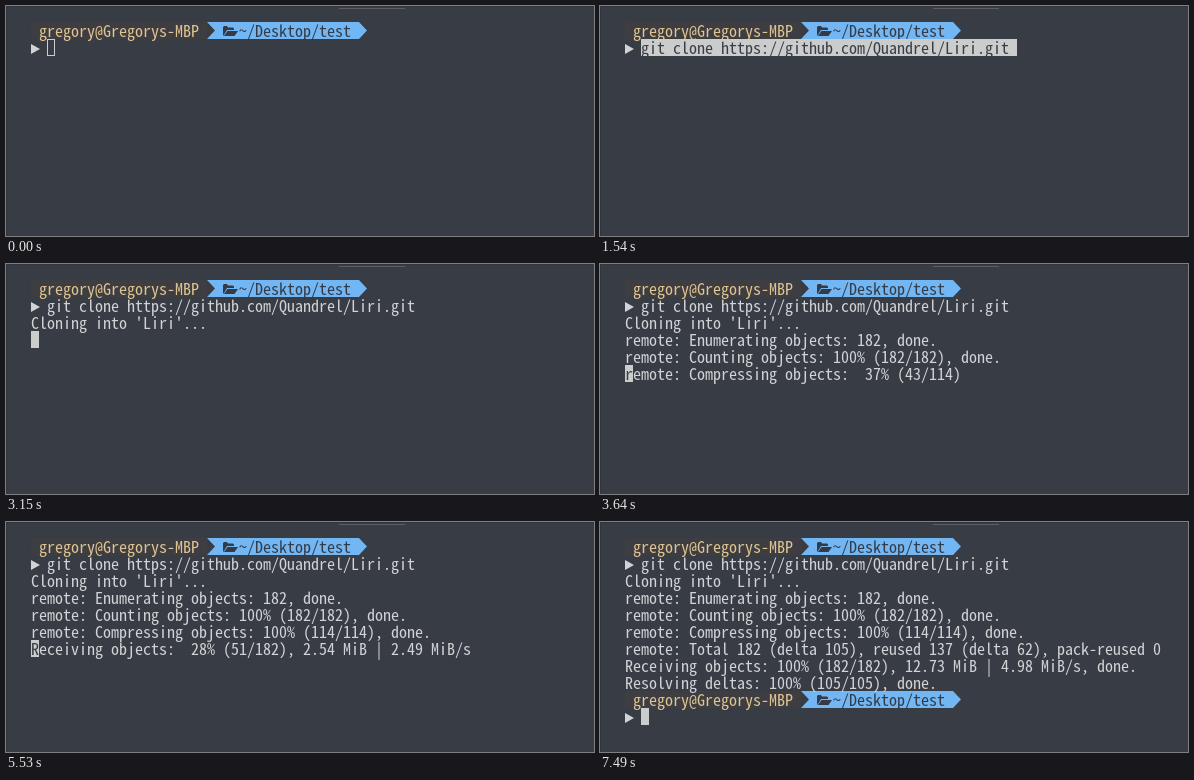
An HTML page with a canvas for the animation above (7560 ms loop, 588 by 230 pixels).

```html
<!DOCTYPE html>
<html lang="en">
<head>
<meta charset="utf-8">
<title>Cloning a repository</title>
<style>
  html, body { margin: 0; width: 100%; height: 100%; overflow: hidden; background: #383c45; }
  canvas { display: block; width: 588px; height: 230px; }
</style>
</head>
<body>
<canvas id="stage" width="588" height="230"></canvas>
<script>
const ctx = document.getElementById('stage').getContext('2d');
const LOOP = 7560, LEFT = 25, TOP = 16, CELL = 8, LINE = 17;
const BG = '#383c45', TEXT = '#d2d3d4', CURSOR = '#cbcccc', BLUE = '#72b6f3', INK = '#343b46';
const FAMILY = '"Noto Sans Mono CJK JP", "Noto Sans Mono CJK SC", "DejaVu Sans Mono", monospace';
const COMMAND = 'git clone https://github.com/Quandrel/Liri.git';

// Choose the font size whose natural advance fills one cell, and centre capitals in the line.
ctx.font = `100px ${FAMILY}`;
const sample = ctx.measureText('H');
const fontSize = CELL / sample.width * 100;
const baseline = Math.round(9 + sample.actualBoundingBoxAscent * fontSize / 200);
ctx.font = `${fontSize}px ${FAMILY}`;

const colX = col => LEFT + col * CELL;
const rowY = row => TOP + row * LINE;

function write(text, col, row, color = TEXT) {
  ctx.fillStyle = color;
  ctx.fillText(text, colX(col), rowY(row) + baseline);
}

function block(col, row, count = 1, color = CURSOR) {
  ctx.fillStyle = color;
  ctx.fillRect(colX(col), rowY(row), count * CELL, LINE);
}

function polygon(color, points) {
  ctx.fillStyle = color;
  ctx.beginPath();
  points.forEach(([x, y]) => ctx.lineTo(x, y));
  ctx.fill();
}

function folder(x, y) {
  polygon(INK, [[x, y + 10], [x, y + 1], [x + 1, y], [x + 4, y], [x + 5, y + 1.5],
    [x + 10, y + 1.5], [x + 11, y + 2.5], [x + 11, y + 4], [x + 4, y + 4], [x + 1, y + 9]]);
  polygon(INK, [[x + 1, y + 10], [x + 4.5, y + 5], [x + 15, y + 5], [x + 11.5, y + 10]]);
}

function prompt(row) {
  const y = rowY(row), mid = y + LINE / 2, end = y + LINE;
  block(0, row, 22, '#3d3d42');
  polygon(BLUE, [[201, y], [353, y], [361, mid], [353, end], [201, end], [209, mid]]);
  write('gregory@Gregorys-MBP', 1, row, '#e0c590');
  folder(217, y + 4);
  write('~/Desktop/test', 26, row, INK);
  polygon(TEXT, [[25, y + 22], [34, y + 27], [25, y + 32]]);
}

// Output lines below the command; each appears, and may be rewritten, at the given times.
const receiving = (percent, count, rate = '') =>
  `Receiving objects:  ${percent}% (${count}/182)${rate && ', ' + rate}`;
const output = [
  [2, 3010, "Cloning into 'Liri'..."],
  [3, 3570, 'remote: Enumerating objects: 182, done.'],
  [4, 3570, 'remote: Counting objects:  58% (106/182)'],
  [4, 3640, 'remote: Counting objects: 100% (182/182), done.'],
  [5, 3640, 'remote: Compressing objects:  37% (43/114)'],
  [5, 3710, 'remote: Compressing objects:  78% (89/114)'],
  [5, 3850, 'remote: Compressing objects: 100% (114/114), done.'],
  [6, 3920, receiving(21, 39)],
  [6, 4690, receiving(27, 50, '1.06 MiB | 996.00 KiB/s')],
  [6, 4970, receiving(27, 50, '2.54 MiB | 2.49 MiB/s')],
  [6, 5530, receiving(28, 51, '2.54 MiB | 2.49 MiB/s')],
  [6, 6090, receiving(28, 52, '7.25 MiB | 3.97 MiB/s')],
  [6, 6230, receiving(29, 53, '7.25 MiB | 3.97 MiB/s')],
  [6, 6580, 'remote: Total 182 (delta 105), reused 137 (delta 62), pack-reused 0'],
  [7, 6580, 'Receiving objects: 100% (182/182), 12.73 MiB | 4.98 MiB/s, done.'],
  [8, 6580, 'Resolving deltas: 100% (105/105), done.']
];

// [time, column, row]
const cursorStops = [
  [490, 2, 1], [1540, 48, 1], [2940, 0, 2], [3010, 0, 3], [3570, 0, 4],
  [3640, 0, 5], [3850, 0, 6], [6580, 0, 9], [6860, 2, 10]
];

function draw(t) {
  ctx.fillStyle = BG;
  ctx.fillRect(0, 0, 588, 230);
  ctx.fillStyle = '#32353c';
  ctx.fillRect(0, 0, 588, 1);
  ctx.fillRect(0, 0, 1, 230);
  ctx.fillStyle = '#5b5e65';
  ctx.fillRect(333, 2, 66, 1);

  prompt(0);
  if (t >= 6860) prompt(9);

  const pasted = t >= 1540 && t < 2940;
  if (pasted) block(2, 1, COMMAND.length);
  if (t >= 1540) write(COMMAND, 2, 1, pasted ? BG : TEXT);

  const lines = {};
  for (const [row, start, text] of output) if (t >= start) lines[row] = text;
  for (const row in lines) write(lines[row], 0, row);

  const stop = cursorStops.filter(([start]) => t >= start).pop();
  if (stop) {
    const [, col, row] = stop;
    block(col, row);
    if (col === 0 && lines[row]) write(lines[row][0], 0, row, BG);
  } else {
    ctx.strokeStyle = CURSOR;
    ctx.strokeRect(colX(2) + 0.5, rowY(1) + 0.5, CELL - 1, LINE - 1);
  }
}

const begin = performance.now();
function frame() {
  draw((performance.now() - begin) % LOOP);
  requestAnimationFrame(frame);
}
frame();
</script>
</body>
</html>
```
